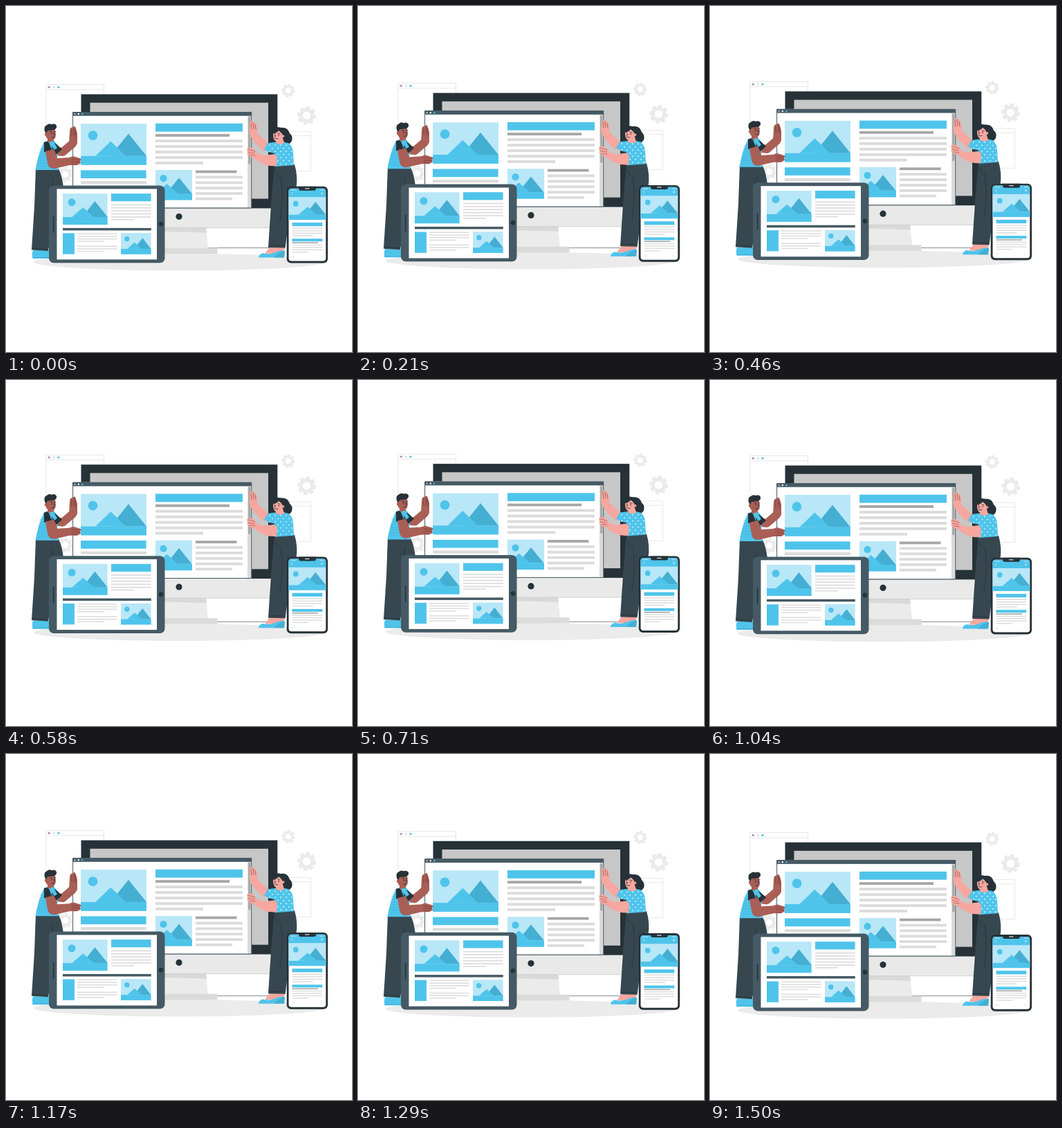
An HTML page with a canvas that plays this animation: 500 by 500 pixels, repeating every 1540 ms.

```html
<!DOCTYPE html>
<html lang="en">
<head>
<meta charset="utf-8">
<style>
html, body { margin: 0; width: 100%; height: 100%; overflow: hidden; background: #fff; }
canvas { display: block; width: 100vw; height: 100vh; }
</style>
</head>
<body>
<canvas id="stage" width="500" height="500"></canvas>
<script>
const ctx = document.getElementById('stage').getContext('2d');
const LOOP = 1540, STEPS = 37, TRAVEL = 7;
const BLUE = '#4fc4eb', DEEP = '#45aed3', SKY = '#b8e7f7', DARK = '#263238', SLATE = '#455a64',
  PANTS = '#37474f', PALE = '#ebebeb', GREY = '#dbdbdb', MID = '#a6a6a6',
  BROWN = '#aa5f56', PINK = '#f6a79f';

function box(x0, y0, x1, y1, color) {
  ctx.fillStyle = color;
  ctx.fillRect(x0, y0, x1 - x0, y1 - y0);
}
function frame(x0, y0, x1, y1, color, width = 1) {
  ctx.strokeStyle = color;
  ctx.lineWidth = width;
  ctx.strokeRect(x0, y0, x1 - x0, y1 - y0);
}
function round(x0, y0, x1, y1, r, color) {
  ctx.fillStyle = color;
  ctx.beginPath();
  ctx.roundRect(x0, y0, x1 - x0, y1 - y0, r);
  ctx.fill();
}
function oval(x, y, rx, color, ry = rx) {
  ctx.fillStyle = color;
  ctx.beginPath();
  ctx.ellipse(x, y, rx, ry, 0, 0, Math.PI * 2);
  ctx.fill();
}
function shape(d, color) {
  ctx.fillStyle = color;
  ctx.fill(new Path2D(d));
}
function stroke(d, color, width = 1) {
  ctx.strokeStyle = color;
  ctx.lineWidth = width;
  ctx.lineCap = ctx.lineJoin = 'round';
  ctx.stroke(new Path2D(d));
}
function rows(x0, x1, height, tops, color = GREY) {
  for (const y of tops) box(x0, y, x1, y + height, color);
}
function peak(x, y, half, base, color) {
  shape(`M${x - half} ${base}L${x} ${y}L${x + half} ${base}Z`, color);
}
function landscape(x0, y0, x1, y1, base, sun, back, front) {
  box(x0, y0, x1, y1, SKY);
  oval(...sun, BLUE);
  peak(...back, base, DEEP);
  peak(...front, base, BLUE);
  box(x0, base, x1, y1, BLUE);
}

function gear(x, y, r) {
  ctx.strokeStyle = PALE;
  ctx.lineWidth = r * 0.37;
  ctx.beginPath();
  ctx.arc(x, y, r * 0.61, 0, Math.PI * 2);
  ctx.stroke();
  ctx.lineCap = 'butt';
  ctx.lineWidth = r * 0.44;
  ctx.beginPath();
  for (let i = 0; i < 8; i++) {
    const a = (i + 0.2) * Math.PI / 4, c = Math.cos(a), s = Math.sin(a);
    ctx.moveTo(x + c * r * 0.65, y + s * r * 0.65);
    ctx.lineTo(x + c * r, y + s * r);
  }
  ctx.stroke();
}

function backdrop() {
  frame(58, 113.5, 141.5, 205, '#e2e2e2', 0.8);
  stroke('M58 120.8H141.5', '#e2e2e2', 0.8);
  oval(62.3, 117.2, 1.6, '#9a9a9a');
  oval(69.2, 117.2, 1.6, '#dedede');
  oval(76, 117.2, 1.6, BLUE);
  frame(360, 181.3, 440.5, 238.5, '#e2e2e2', 0.8);
  stroke('M360 187.5H440.5', '#e2e2e2', 0.8);
  gear(407.8, 122.3, 9.6);
  gear(434.5, 158.2, 13.4);
  gear(85.5, 243.5, 11);
  oval(250, 370, 210, PALE, 12.3);
}

function monitor() {
  shape('M200 320H289L292 350H200Z', PALE);
  shape('M200 320H289L290 327.5L200 325Z', '#d9d9d9');
  box(200, 349.5, 305.5, 358, GREY);
  box(108.5, 292, 381, 320.5, '#e9e9e9');
  stroke('M229 320.5H381', '#c9c9c9', 0.8);
  box(108.5, 127.5, 392.3, 292.3, DARK);
  box(121.5, 139.7, 379, 278.5, '#c7c7c7');
  oval(250, 304.3, 4.6, DARK);
}

function browser() {
  box(96.5, 153, 355, 292, '#fff');
  box(349, 158.5, 354.5, 292, GREY);
  box(350.2, 160, 353.3, 228, MID);
  frame(97, 153.5, 354.7, 291.8, SLATE, 1);
  box(96.5, 153, 355, 158.7, SLATE);
  oval(99.6, 156, 1.2, '#b5b5b5');
  oval(104.8, 156, 1.2, '#fff');
  oval(110.2, 156, 1.2, BLUE);

  landscape(108, 170, 203, 229.7, 216.8, [125.5, 187, 6.9], [177, 184.5, 26], [151.3, 195.5, 22]);
  box(108, 237.3, 202.6, 249, BLUE);
  box(108, 253, 203, 257, GREY);
  box(216, 169.7, 342, 181.5, BLUE);
  box(216, 185, 323, 188.8, MID);
  rows(216, 342, 3.9, [193, 201, 209, 217]);
  box(216, 224.8, 285, 228.7, GREY);
  landscape(216, 237, 269, 280.4, 271, [227.5, 249, 5.1], [250, 248.3, 18.5], [232.5, 257, 16]);
  box(274, 237.5, 333.5, 241.3, MID);
  rows(274, 342, 3.8, [245.4, 253.3, 261.2, 269]);
  box(274, 276.7, 327, 280.5, GREY);
}

function man() {
  shape('M39 353H62V365H38.5Q37 358 39 353Z', BLUE);
  stroke('M39 363.5H62', DEEP, 1);
  shape('M43 235H76Q81 245 83 262L70 300L61 354L37 352.5L41 290Z', PANTS);
  stroke('M68 250Q64 270 62 300M38 350L60 351.5', DARK, 0.8);

  // raised arm
  stroke('M74 210L82 211L96 199', BROWN, 12);
  shape('M91 198L92 182Q92 177 94 176L98 174Q100 173 101 177L103 184L103 199L97 206Z', BROWN);
  stroke('M95 188V178M98.5 187V176M101 189L100.5 179', '#65332e', 0.7);

  shape('M55 196L69 194L76 203L74 220L76 237H42.5Q46 215 55 196Z', BLUE);
  for (let y = 207; y < 235; y += 4) stroke(`M${48.5 - (y - 207) / 7} ${y}H72`, DEEP, 0.5);
  shape('M65 196L72 199L81 207L72 215L67 209Z', DARK);
  shape('M55 197L61 195L67 210L55 211Z', DARK);
  shape('M60 189L69 188L69 198Q65 202 60 196Z', BROWN);
  shape('M62 197L68 195L74 205L70 208Z', BLUE);

  // lower arm
  shape('M57 210L69 207Q73 214 74 220L91 219L97 217L107 220Q110 222 107 224L108 227Q106 229 102 230L92 230L70 235Q62 236 60 227Z', BROWN);
  stroke('M95 221L106 222.5M95 224.5L107 225.5M95 228L103 229', '#65332e', 0.6);

  shape('M57 178Q64 173 71 178L72 187Q71 194 66 194Q59 194 57 187Z', BROWN);
  oval(58, 185.5, 2.2, BROWN);
  shape('M56 181Q54 174 59 172Q62 169 66 171Q71 169 73 173Q74 177 69 179L60 180L58 184Z', DARK);
  stroke('M64 181.5L67 182M69.5 182L71.5 181.5M66 190L70 189.5M69 184L70 187', DARK, 0.9);
  oval(66, 184.5, 0.8, DARK);
  oval(70.7, 184.3, 0.7, DARK);
}

function woman() {
  shape('M381 349L404 348L400 357L374 358Q377 353 381 349Z', PINK);
  shape('M371 357Q379 360 389 356Q398 352 403 354L402 363.5H365Q365 359 371 357Z', BLUE);
  shape('M387 363.5Q395 355 403 354L402 363.5Z', DEEP);
  shape('M388 229L417 229Q422 246 419.5 262L410 301L403.5 349.5L379 349L383 286Z', PANTS);
  stroke('M397 246Q400 268 399 285L396 310M380 346L403 346.5M388 238L395 248', DARK, 0.8);

  shape('M396 176Q407 174 410 184Q415 188 413 195Q409 202 401 199Z', DARK);
  // raised arm
  shape('M352 169Q354 165 358 167L362 171Q364 179 363 184L380 199L374 210Q365 205 355 191Q350 183 352 177Z', PINK);
  stroke('M355 178L354 169M358 177L357 168M361 178L360 171', '#87504b', 0.7);
  shape('M378 198L395 196L407 197Q415 203 415 212L416 230L389 232L388 213L380 211L373 207Z', BLUE);
  for (let row = 0; row < 7; row++)
    for (let x = 381 + row % 2 * 4; x < 414; x += 8) {
      const y = 201 + row * 4.5;
      if (y < 211 || x > 390) oval(x, y, 0.85, '#fff');
    }
  // lower arm
  shape('M348 207Q350 203 358 206L363 213L372 216L388 214L392 218L391 231Q374 233 360 221L352 217Q346 214 350 212Z', PINK);
  stroke('M350 207L360 210M349 211L359 213M352 215L360 216', '#87504b', 0.6);

  shape('M390 192L400 191L402 198Q396 202 390 198Z', PINK);
  shape('M386 181Q391 176 399 181L400 190Q397 197 391 196Q386 194 386 187Z', PINK);
  shape('M386 184Q384 176 393 175Q405 176 406 185L409 197Q402 200 401 190Q400 184 394 180Q391 184 386 184Z', DARK);
  oval(400.5, 188, 1.8, PINK);
  stroke('M387 184.5L389 184M393 184L396 185M388 191Q390 193 393 191.5M389.5 187L388.5 189.5', DARK, 0.8);
  oval(388.3, 186.7, 0.7, DARK);
  oval(394, 187, 0.8, DARK);
}

function tablet() {
  round(62, 259.4, 229.5, 371.2, 7, SLATE);
  box(73.5, 264.3, 218, 366.3, '#fff');
  oval(224, 315, 3.3, DARK);
  stroke('M68.7 304V327', DARK, 1.5);
  landscape(82, 271, 146.6, 316, 305, [95, 283.6, 5.5], [128.5, 282, 18.4], [111.3, 291, 16]);
  box(152, 271, 209.6, 282.2, BLUE);
  rows(152, 209.6, 1.7, [286.5, 290.8, 295.2, 299.6, 304]);
  box(152, 307.8, 185, 309.5, GREY);
  box(82, 320.8, 209.8, 324.3, SLATE);
  box(82, 328.3, 99, 358.6, BLUE);
  rows(103, 160.5, 1.5, [328.4, 332.1, 335.8, 346.5, 350.2]);
  rows(103, 142.3, 1.5, [339.4, 353.8]);
  landscape(166, 328, 209.6, 358.7, 351, [174.8, 336.5, 3.7], [197.3, 335.2, 12.3], [185.8, 341.5, 10.8]);
}

function phone() {
  round(405.7, 260.8, 465, 371.5, 6, DARK);
  round(408.5, 263.7, 462.2, 368.5, 4, '#fff');
  round(408.5, 263.7, 462.2, 277, [4, 4, 0, 0], BLUE);
  round(423, 260.8, 448, 266.8, [0, 0, 3, 3], DARK);
  stroke('M432.5 263.8H438', '#fff', 1);
  stroke('M413.8 269.2L412.3 270.7L413.8 272.2M412 266H419M454 266H459', '#d5f0fa', 0.8);
  oval(456.5, 270.6, 1.5, '#a9e2f5');
  landscape(408.5, 276, 462.2, 309, 301.7, [418.7, 285.6, 3.9], [447.3, 283, 15], [436, 290, 13.5]);
  box(413.5, 313, 457.2, 318.2, BLUE);
  rows(413.5, 457.2, 1.5, [320.4, 324, 327.6]);
  box(413.5, 331.1, 443.5, 332.6, GREY);
  box(413.5, 336.2, 457.2, 340.2, BLUE);
  box(413.5, 341.3, 451, 342.9, MID);
  rows(413.5, 457.2, 1.4, [344.7, 348, 351.5]);
  box(413.5, 355, 437.5, 356.4, GREY);
  stroke('M413.5 362.2L415 360.8L416.5 362.2V363.2H413.5Z', '#e3dede', 0.7);
  oval(455.3, 362, 1.7, '#efeaea');
  oval(455.3, 362, 1, '#fff');
}

function draw(now) {
  const step = Math.floor(((now + 5) % LOOP) * STEPS / LOOP);
  const phase = ((step + 0.7) / STEPS) % 1;
  const lift = 1 - Math.abs(1 - 2 * phase);
  box(0, 0, 500, 500, '#fff');
  ctx.save();
  ctx.translate(0, 0.3 - TRAVEL * lift);
  backdrop();
  ctx.restore();
  box(240, 349, 381, 349.8, '#697377');
  ctx.save();
  ctx.translate(0, 0.3 - TRAVEL * lift);
  [monitor, browser, man, woman, tablet, phone].forEach(part => part());
  ctx.restore();
}

const start = performance.now();
function tick() {
  draw(performance.now() - start);
  requestAnimationFrame(tick);
}
tick();
</script>
</body>
</html>
```
